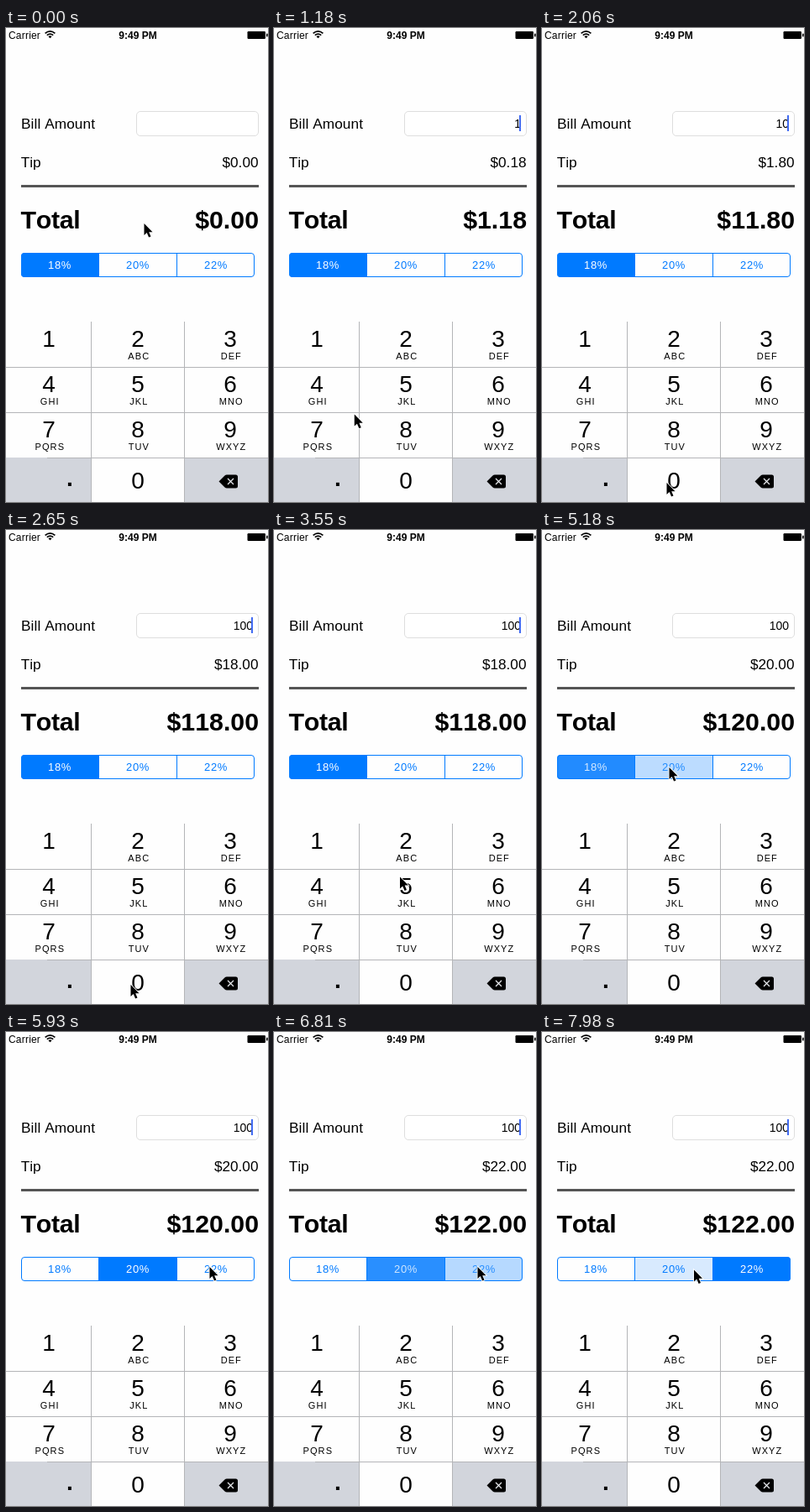
Write an HTML page that moves like this. It is 312x565 px and loops after 8 s.

```html
<!DOCTYPE html>
<html lang="en">
<head>
<meta charset="utf-8">
<title>Tip calculator</title>
<style>
html, body { margin: 0; width: 100%; height: 100%; overflow: hidden; background: #fefefe; }
svg { display: block; width: 312px; height: 565px; font-family: "Liberation Sans", Arial, sans-serif; font-size: 17.2px; font-kerning: none; }
.mid { text-anchor: middle; }
.end { text-anchor: end; }
.big { font-size: 30.3px; font-weight: bold; }
.seg { font-size: 13px; letter-spacing: .6px; }
.num { font-size: 28px; }
.abc { font-size: 11px; letter-spacing: 1.1px; }
</style>
</head>
<body>
<svg viewBox="0 0 312 565">
  <defs><clipPath id="pill"><rect x="18" y="268" width="278" height="29" rx="4"/></clipPath></defs>

  <text x="3" y="12.5" font-size="12" letter-spacing=".2">Carrier</text>
  <path d="M46.6 6.4Q52.5 1.2 58.4 6.4M48.8 8.7Q52.5 5.4 56.2 8.7" fill="none" stroke="#000" stroke-width="1.7"/>
  <path d="M50.4 10L52.5 12.3L54.6 10Q52.5 8.3 50.4 10Z"/>
  <text class="mid" x="157" y="12.5" font-size="12" font-weight="bold">9:49 PM</text>
  <rect x="287.5" y="4" width="21.5" height="9" rx="1.2"/>
  <rect x="310" y="6.5" width="1.6" height="4" rx=".8"/>

  <text x="18" y="119.5" letter-spacing=".1">Bill Amount</text>
  <rect x="155.5" y="99.5" width="145" height="29" rx="4.5" fill="#fff" stroke="#dedede"/>
  <text id="bill" class="end" x="294" y="119" font-size="14"></text>
  <rect id="caret" x="292" y="104" width="2" height="19" fill="#426bf2"/>
  <text x="17.7" y="165.5">Tip</text>
  <text id="tip" class="end" x="300.5" y="165.5"></text>
  <rect x="18" y="187" width="283" height="3" fill="#555"/>
  <text class="big" x="17.5" y="239.3" font-kerning="normal" letter-spacing="-.3">Total</text>
  <text id="total" class="end big" x="301" y="238.6"></text>

  <g id="segments" clip-path="url(#pill)"></g>
  <g fill="none" stroke="#007aff">
    <rect x="18.5" y="268.5" width="277" height="28" rx="3.5"/>
    <path d="M110.5 268V297M203.5 268V297"/>
  </g>

  <rect id="press1" y="350" width="101" height="54" fill="#d2d5db"/>
  <rect id="press0" x="102" y="513" width="110" height="52" fill="#d2d5db"/>
  <path d="M0 512H101V565H0ZM213 512H312V565H213Z" fill="#d2d5dc"/>
  <path d="M101.5 350V565M212.5 350V565M0 404.5H312M0 458.5H312M49 512.5H312" stroke="#b4b5b8" fill="none"/>
  <g id="keys"></g>
  <text class="mid num" x="76" y="546" font-weight="bold">.</text>
  <path d="M253.5 540.5L260.5 533.5Q261.5 532.5 263 532.5H273.5Q276 532.5 276 535V546Q276 548.5 273.5 548.5H263Q261.5 548.5 260.5 547.5Z"/>
  <path d="M264 537L271 544M271 537L264 544" stroke="#e4e6ea" stroke-width="1.3"/>

  <path id="cursor" d="M0 0V14L3.2 11.1L5.6 16.6L8 15.6L5.7 10.2H10Z" stroke="#fff" stroke-width="1.6" paint-order="stroke"/>
</svg>
<script>
const LOOP = 8000, STEP = 147.8, TINT = 0.15;
const rates = [18, 20, 22];
const typed = [{ key: '1', up: 1180 }, { key: '0', up: 2060 }, { key: '0', up: 2650 }];
const taps = [
  { segment: 1, down: 5020, up: 5100 },
  { segment: 2, down: 6500, up: 6718 },
  { segment: 1, down: 7950, up: LOOP }
];
const home = { x: 164.5, y: 233 };
const moves = [
  { from: 0, to: 740, x: 50, y: 390 },
  { from: 1030, to: 1350, x: 148.5, y: 542 },
  { from: 2960, to: 4140, x: 151.5, y: 283 },
  { from: 5170, to: 5920, x: 242.5, y: 280 },
  { from: 6900, to: 7700, x: 181, y: 283.5 }
];

const el = id => document.getElementById(id);
const show = (id, on) => el(id).setAttribute('opacity', on ? 1 : 0);
const mix = (a, b, k) => a + (b - a) * k;
const money = v => '$' + v.toFixed(2);
const ease = k => {
  k = Math.min(1, Math.max(0, k));
  return k * k * (3 - 2 * k);
};
const make = (parent, tag, attrs, text = '') => {
  const node = document.createElementNS('http://www.w3.org/2000/svg', tag);
  for (const k in attrs) node.setAttribute(k, attrs[k]);
  node.textContent = text;
  return parent.appendChild(node);
};

const columns = [51, 157, 267];
['', 'ABC', 'DEF', 'GHI', 'JKL', 'MNO', 'PQRS', 'TUV', 'WXYZ'].forEach((letters, i) => {
  const x = columns[i % 3], y = 379.6 + 54 * Math.floor(i / 3);
  make(el('keys'), 'text', { class: 'mid num', x, y }, i + 1);
  make(el('keys'), 'text', { class: 'mid abc', x: x + 1.3, y: y + 15.4 }, letters);
});
make(el('keys'), 'text', { class: 'mid num', x: 157, y: 549 }, '0');

const segments = rates.map((rate, i) => ({
  back: make(el('segments'), 'rect', { x: 17.5 + 93 * i, y: 268, width: 93, height: 29, fill: '#007aff' }),
  label: make(el('segments'), 'text', { class: 'mid seg', x: 64 + 93 * i, y: 287 }, rate + '%')
}));

// A touch tints a segment; letting go cross-fades the selection to it.
function segmentLevels(t) {
  return taps.filter(tap => t >= tap.down).reduce((levels, tap) => {
    const k = ease((t - tap.up) / 320);
    return levels.map((v, i) => i === tap.segment ? mix(TINT, 1, k) : v * (1 - k));
  }, [1, 0, 0]);
}

function caretOn(t) {
  const first = typed[0].up;
  if (t >= first && t < 3100) return true;   // steady while typing
  const blinkStart = t < first ? -10 : 4214 - 2 * 665;
  return (t - blinkStart) % 665 >= 300;
}

function pointer(t) {
  return moves.reduce((p, m) => {
    const k = ease((t - m.from) / (m.to - m.from));
    return { x: mix(p.x, m.x, k), y: mix(p.y, m.y, k) };
  }, home);
}

function draw(now) {
  const t = STEP * Math.floor((now % LOOP + 15) / STEP);
  const bill = typed.filter(d => t >= d.up).map(d => d.key).join('');
  const released = taps.filter(tap => t >= tap.up).pop();
  const rate = rates[released ? released.segment : 0] / 100;
  el('bill').textContent = bill;
  el('tip').textContent = money(bill * rate);
  el('total').textContent = money(bill * (1 + rate));
  show('caret', caretOn(t));
  for (const key of '10') {
    show('press' + key, typed.some(d => d.key === key && t >= d.up - 150 && t < d.up));
  }
  segmentLevels(t).forEach((level, i) => {
    const white = Math.max(0, (level - TINT) / (1 - TINT));
    segments[i].back.setAttribute('opacity', level);
    segments[i].label.setAttribute('fill', `rgb(${mix(0, 255, white)},${mix(122, 255, white)},255)`);
  });
  const { x, y } = pointer(t);
  el('cursor').setAttribute('transform', `translate(${x},${y})`);
}

const start = performance.now();
function tick() {
  draw(performance.now() - start);
  requestAnimationFrame(tick);
}
tick();
</script>
</body>
</html>
```
